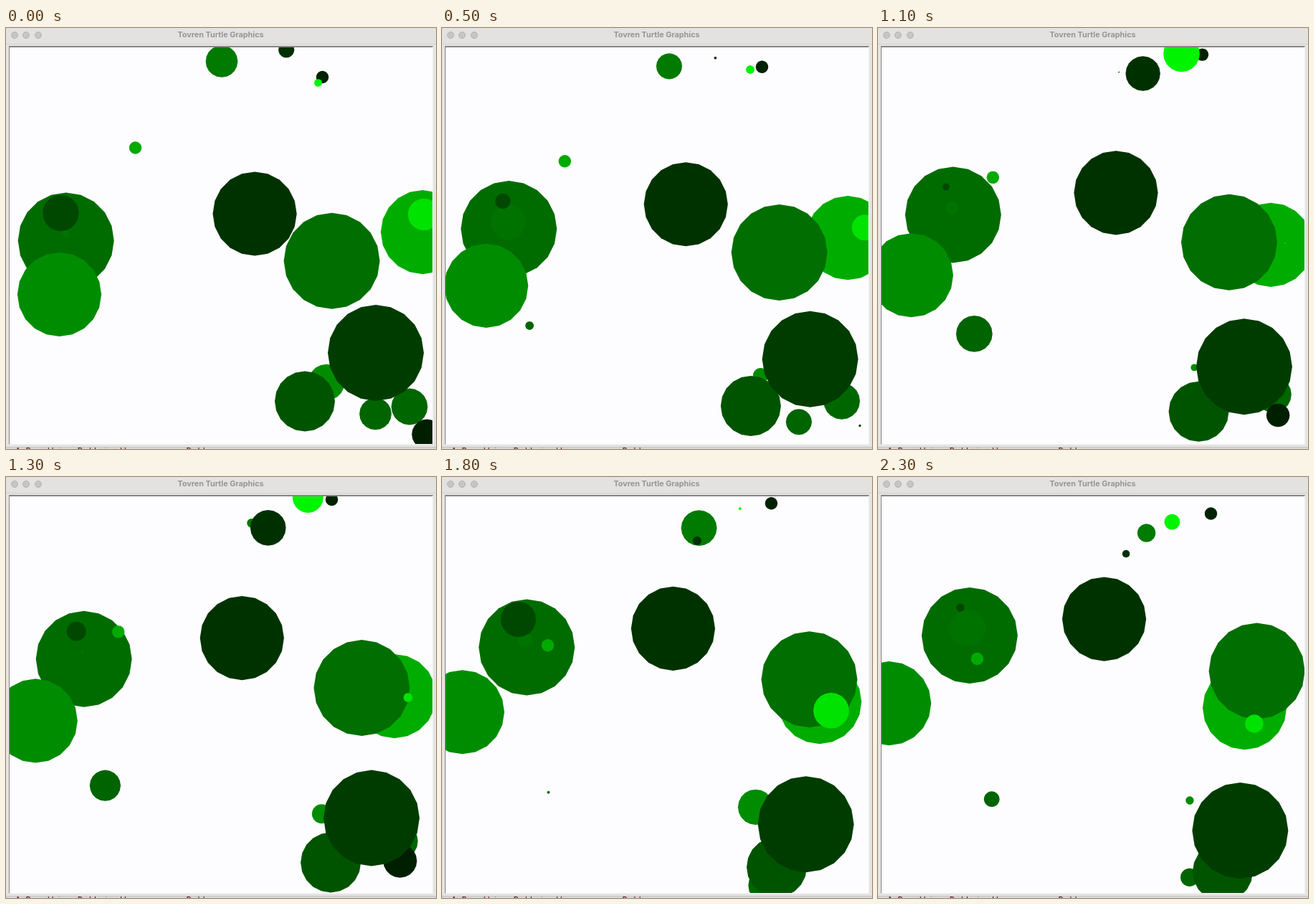
Animation, 600 px wide and 587 px high, one loop 2.4 s. Source, as an HTML page with a canvas:

```html
<!DOCTYPE html>
<html lang="en">
<head>
<meta charset="utf-8">
<title>Breathing balls</title>
<style>
  html, body { margin: 0; width: 100%; height: 100%; overflow: hidden; }
  body { position: relative; background: #e5e4e3; }
  .bar {
    position: absolute; left: 0; top: 0; width: 600px; height: 22px;
    background: #e3e2e1; border-bottom: 1px solid #d3d2d1;
  }
  .bar i {
    position: absolute; top: 5px; width: 10px; height: 10px; box-sizing: border-box;
    border: 1px solid #b4b3b2; border-radius: 50%; background: #c6c5c4;
  }
  .bar b {
    position: absolute; left: 0; width: 599px; top: 2px;
    font: 700 10.8px/16px Inter, "Liberation Sans", sans-serif;
    text-align: center; color: #979594;
  }
  .view {
    position: absolute; left: 4px; top: 25px; width: 590px; height: 553px;
    border: 1px solid; border-color: #868686 #f3f3f3 #f3f3f3 #868686;
    border-top-width: 2px;
  }
  canvas { display: block; }
  .strip {
    position: absolute; left: 0; top: 584px; width: 600px; height: 3px;
    overflow: hidden; background: #d9d8d8; border-top: 1px solid #c4c3c3; box-sizing: border-box;
  }
  .strip span {
    position: absolute; left: 13px; top: -2px; white-space: pre;
    font: 12px/14px "DejaVu Sans Mono", monospace; color: #5c1422;
  }
</style>
</head>
<body>
<div class="bar">
  <i style="left:7px"></i><i style="left:23px"></i><i style="left:40px"></i>
  <b>Tovren Turtle Graphics</b>
</div>
<div class="view"><canvas width="590" height="553"></canvas></div>
<div class="strip"><span>A Breathing Ball in the a canvas Ball</span></div>
<script>
const LEFT = 5, TOP = 27;
const STEP = 100, STEPS = 24;
const WALL = { top: 27, right: 595.5, bottom: 574 };
const RAD = Math.PI / 180;
const PULSE = 21.4; // degrees per step

const ctx = document.querySelector('canvas').getContext('2d');

// Start position, velocity per step, green level, then size or breathing phase
const ball = (x, y, dx, dy, green, radius) =>
  ({ x, y, dx, dy, color: `rgb(0,${green},0)`, radius });
const solid = (x, y, dx, dy, green, r) => ball(x, y, dx, dy, green, () => r);
const breathing = (x, y, dx, dy, green, phase) =>
  ball(x, y, dx, dy, green, n => 0.6 + 12.4 * (1 + Math.cos((phase + PULSE * n) * RAD)));

// Back to front
const balls = [
  breathing(112, 405.5, 2.03, 1.9, 100, 128),
  solid(83.7, 296.5, 1.92, -3.28, 108, 67),
  breathing(83.5, 287, 1.8, -3.29, 114, 232),
  breathing(76.5, 258, 1.67, -3.3, 72, -6),
  solid(180.5, 167, -1.83, 3.76, 170, 8.7),
  solid(74.5, 371.5, -2.56, -2.43, 140, 58.6),
  breathing(301, 46.5, 3.2, 1.37, 122, -41),
  breathing(391.2, 30.4, -1.96, -3.63, 48, 99),
  solid(441.5, 68.5, 1, -2.85, 34, 8.7),
  breathing(435.5, 76.5, -1.09, -3.7, 244, 128),
  solid(347.1, 259, -1.37, -2.65, 50, 58.6),
  solid(581.5, 284.6, -3.04, 1.61, 172, 58.6),
  solid(454.6, 324.8, 3.22, -2.36, 110, 67),
  breathing(583.2, 260, 3.6, 3.65, 226, -41),
  breathing(447.2, 494, -0.53, -1.87, 140, -6),
  solid(563, 528, -1.05, -1.55, 102, 25.4),
  breathing(515.5, 538, -3.51, 2.25, 100, -41),
  breathing(587.2, 566.5, 4.15, -2.41, 30, 50),
  solid(417, 520.5, 2.78, 1.3, 84, 42),
  solid(516, 453, -0.46, 1.74, 60, 67)
];

function place({ x, y, dx, dy }, n) {
  let px = x + dx * n, py = y + dy * n;
  if (px > WALL.right) px = 2 * WALL.right - px;
  if (py < WALL.top) py = 2 * WALL.top - py;
  if (py > WALL.bottom) py = 2 * WALL.bottom - py;
  return [px, py];
}

function draw(n) {
  ctx.setTransform(1, 0, 0, 1, -LEFT, -TOP);
  ctx.fillStyle = '#fdfcfe';
  ctx.fillRect(LEFT, TOP, 590, 553);
  for (const b of balls) {
    const [x, y] = place(b, n), r = b.radius(n);
    ctx.beginPath();
    for (let a = 0; a < 360; a += 18) {
      ctx.lineTo(x + r * Math.cos(a * RAD), y + r * Math.sin(a * RAD));
    }
    ctx.fillStyle = b.color;
    ctx.fill();
  }
}

const start = performance.now();
function tick() {
  draw(Math.floor((performance.now() - start) / STEP) % STEPS);
  requestAnimationFrame(tick);
}
tick();
</script>
</body>
</html>
```
